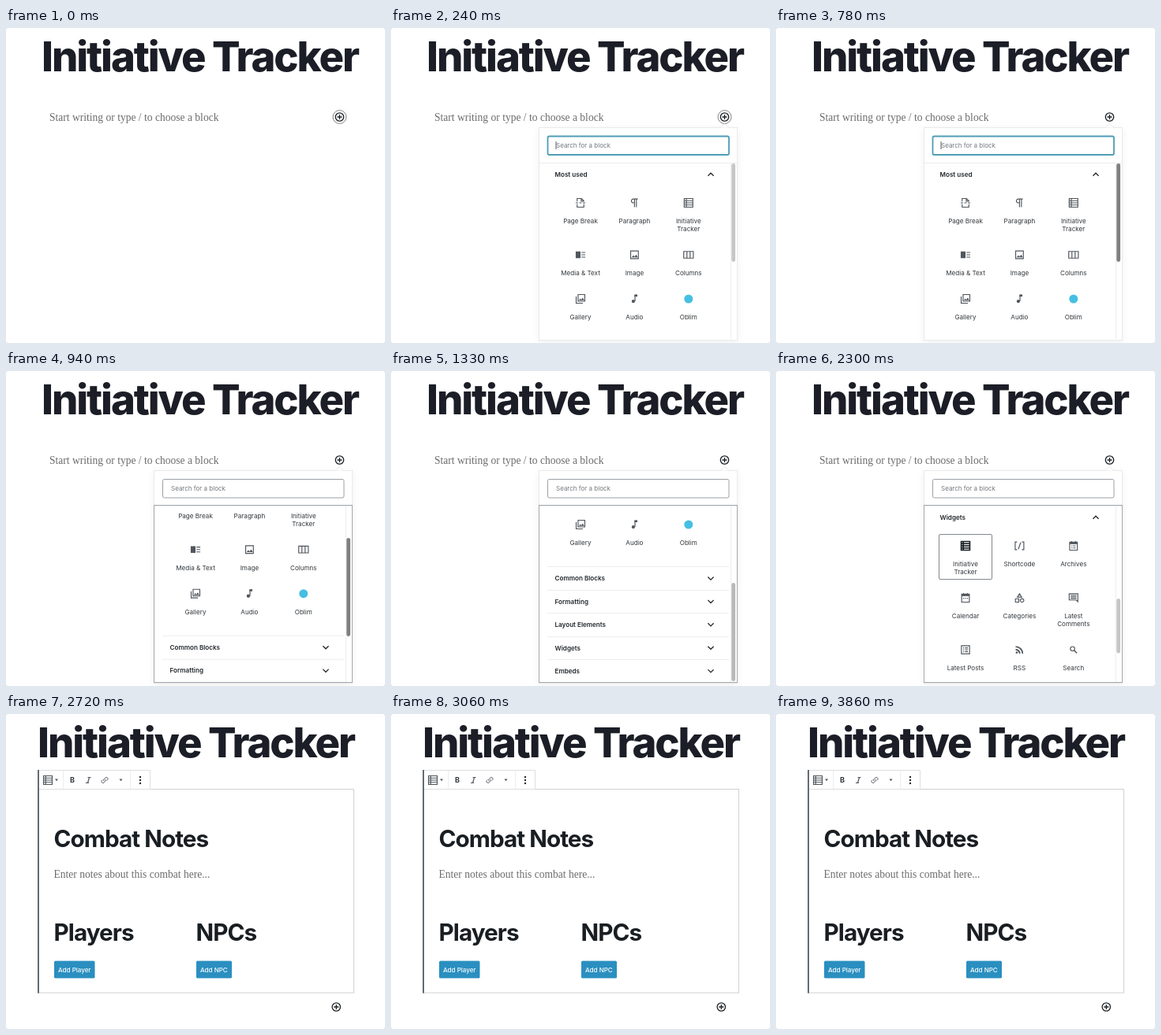
Write an HTML page that moves like this. It is 480x400 px and loops after 4.04 s.

```html
<!DOCTYPE html>
<html lang="en">
<head>
<meta charset="utf-8">
<title>Initiative Tracker block</title>
<style>
  html, body { margin: 0; width: 100%; height: 100%; overflow: hidden; background: #fff; }
  svg { display: block; width: 480px; height: 400px; }
  text { font: 400 8px Inter, sans-serif; fill: #32373c; }
  .title { font-weight: 800; font-size: 52.6px; letter-spacing: -.0395em; fill: #1b1e26; text-anchor: middle; }
  .heading { font-weight: 700; font-size: 29.7px; letter-spacing: -.032em; fill: #191e23; }
  .prompt { font: 13.55px "Liberation Serif", serif; fill: #6c6c6c; }
  .label { font-size: 8.1px; text-anchor: middle; }
  .panel { font-size: 8.1px; font-weight: 600; fill: #23282d; }
  .hint { fill: #72777c; }
  .button { font-weight: 500; fill: #fff; }
  .line { fill: none; stroke: #ebedef; }
  .icon { fill: none; stroke: #50565d; stroke-width: 1.9; }
  .solid { fill: #50565d; stroke: none; }
  .dark .icon { stroke: #191e23; stroke-width: 2.5; }
  .chevron { fill: none; stroke: #23282d; stroke-width: 1.3; }
  .caret { stroke: #32373c; stroke-width: .8; }
</style>
</head>
<body>
<svg id="stage" viewBox="0 0 480 400"></svg>
<script>
const LOOP = 4040;
const OPEN = [140, 220], RING_OFF = 440, DRAG = [800, 1120], WIDGETS = 1640, HOVER = 2020, INSERT = 2440;
const SCROLL = 149;

// Icons are drawn in a 24 unit box: [stroked path, filled path].
const table = 'M3 3h18v18H3zM3 7.5h18M3 12h18M3 16.5h18M7.5 3v18';
const calendar = 'M4 4.5h16V21H4zM8 2v3M16 2v3', calendarTop = 'M4 4h16v4.5H4z';
const icons = {
  pageBreak: ['M5 9V3h9l5 5v1M13.5 3v5.5H19M5 15v6h14v-6M2 12h5M9.5 12h5M17 12h5'],
  paragraph: ['M19 4H9.5a4 4 0 0 0 0 8H12M12 4v17M16 4v17'],
  tracker: [table],
  mediaText: ['M14 7h8M14 12h8M14 17h8', 'M2 5h10v14H2z'],
  image: ['M4 4h16v16H4z', 'M6 17.5l3.5-4.5 2.5 3 3.5-4.5 3.5 6z'],
  columns: ['M2 5h20v14H2zM8.7 5v14M15.3 5v14'],
  gallery: ['M7 3h14v14H7zM3 7v14h14', 'M8.5 15l3-4 2.2 2.6L16.5 9.5l3.5 5.5z'],
  audio: ['M13 17V4.5h4.5', 'M13 17a3.5 3.5 0 1 1-7 0a3.5 3.5 0 1 1 7 0M12 3h6v4h-6z'],
  shortcode: ['M7 4H3v16h4M17 4h4v16h-4M14.5 5l-5 14'],
  archives: [calendar + 'M7.5 12h2M11 12h5.5M7.5 16.5h2M11 16.5h5.5', calendarTop],
  calendar: [calendar + 'M7 13h2M11 13h2M15 13h2', calendarTop],
  categories: ['M12 3.5l4.5 7h-9zM3.5 14h7v7h-7zM21 17.5a3.7 3.7 0 1 1-7.4 0a3.7 3.7 0 1 1 7.4 0'],
  comments: ['M3 3.5h18V20l-3.5-3.5H3zM6 7h12M6 10h12M6 13h12'],
  posts: ['M3.5 3.5h17v17h-17zM7 8h2M11 8h6M7 12h2M11 12h6M7 16h2M11 16h6'],
  rss: ['', 'M4 4v3.2A12.8 12.8 0 0 1 16.8 20H20A16 16 0 0 0 4 4zM4 10v3.2A6.8 6.8 0 0 1 10.8 20H14A10 10 0 0 0 4 10zM8.4 17.8a2.2 2.2 0 1 1-4.4 0a2.2 2.2 0 1 1 4.4 0'],
  search: ['M14.5 10a4.5 4.5 0 1 1-9 0a4.5 4.5 0 1 1 9 0', 'M12.5 14l1.500-1.500 6 5.500-2 2z'],
  link: ['M10.5 14.5a4 4 0 0 1 0-5.5l3.5-3.5a4 4 0 0 1 5.5 5.5l-2 2M13.5 9.5a4 4 0 0 1 0 5.5L10 18.5a4 4 0 0 1-5.5-5.5l2-2']
};

const text = (x, y, words, cls) => `<text x="${x}" y="${y}" class="${cls}">${words}</text>`;
const rect = (x, y, w, h, attrs) => `<rect x="${x}" y="${y}" width="${w}" height="${h}" ${attrs}/>`;
const path = (d, cls) => `<path d="${d}" class="${cls}"/>`;

function icon(name, x, y, size = 14.6) {
  const k = size / 24, [stroked, filled = ''] = icons[name];
  return `<g transform="translate(${x - 12 * k} ${y - 12 * k}) scale(${k})">${path(stroked, 'icon')}${path(filled, 'solid')}</g>`;
}

function tile(column, y, name, ...lines) {
  const x = 240 + column * 68.4;
  const mark = name === 'disc' ? `<circle cx="${x}" cy="${y}" r="5.5" fill="#46bfe2"/>` : icon(name, x, y);
  return mark + lines.map((line, i) => text(x, y + 26 + i * 10, line, 'label')).join('');
}

function panelHeader(y, name, open) {
  const tip = open ? -1.8 : 1.8;
  return text(207.5, y + 3, name, 'panel') +
    path(`M401.4 ${y - tip}L405 ${y + tip}L408.6 ${y - tip}`, 'chevron');
}

const plus = (x, y) =>
  `<g fill="none" stroke="#191e23" stroke-width="1.3"><circle cx="${x}" cy="${y}" r="5.2"/><path d="M${x - 3} ${y}h6M${x} ${y - 3}v6"/></g>`;

const mostUsed = panelHeader(186, 'Most used', true) +
  tile(0, 222, 'pageBreak', 'Page Break') + tile(1, 222, 'paragraph', 'Paragraph') +
  tile(2, 222, 'tracker', 'Initiative', 'Tracker') +
  tile(0, 288, 'mediaText', 'Media &amp; Text') + tile(1, 288, 'image', 'Image') + tile(2, 288, 'columns', 'Columns') +
  tile(0, 344, 'gallery', 'Gallery') + tile(1, 344, 'audio', 'Audio') + tile(2, 344, 'disc', 'Oblim') +
  ['Common Blocks', 'Formatting', 'Layout Elements', 'Widgets', 'Embeds'].map((name, i) => {
    const y = 412.3 + i * 29.4;
    return path(`M198 ${Math.round(y - 15) + .5}h230`, 'line') + panelHeader(y, name, false);
  }).join('');

const widgets = panelHeader(186, 'Widgets', true) +
  tile(0, 222, 'tracker', 'Initiative', 'Tracker') + tile(1, 222, 'shortcode', 'Shortcode') +
  tile(2, 222, 'archives', 'Archives') +
  tile(0, 288, 'calendar', 'Calendar') + tile(1, 288, 'categories', 'Categories') +
  tile(2, 288, 'comments', 'Latest', 'Comments') +
  tile(0, 354, 'posts', 'Latest Posts') + tile(1, 354, 'rss', 'RSS') + tile(2, 354, 'search', 'Search') +
  `<g id="hover" class="dark">${rect(206.5, 207.5, 67, 57, 'rx="1.5" fill="none" stroke="#82878c"')}${icon('tracker', 240, 222)}</g>`;

const inserter =
  rect(187.5, 126.5, 251, 270, 'fill="#fff" stroke="#e8eaec" filter="url(#shadow)"') +
  '<path d="M417 126.5l5.5-5 5.5 5" fill="#fff" stroke="#e8eaec"/>' +
  rect(198.5, 137.5, 229.5, 23.5, 'id="field" rx="2" fill="#fff"') +
  text(209, 152, 'Search for a block', 'hint') +
  path('M209 144v10', 'caret') +
  path('M188 171.5h250M430.5 172v223', 'line') +
  `<g clip-path="url(#view)"><g id="mostUsed">${mostUsed}</g><g id="widgets">${widgets}</g></g>` +
  rect(431.3, 172, 4.8, 125, 'id="thumb" rx="2.4"') +
  rect(187.5, 170.5, 251, 225, 'id="focus" fill="none" stroke="#a5a8ac"');

const button = (x, w, words) => rect(x, 313.5, w, 22, 'rx="1.5" fill="#2a8fc0"') + text(x + 5, 327.5, words, 'button');

const block =
  text(240.5, 55, 'Initiative Tracker', 'title') +
  rect(40.5, 95.5, 400, 258.5, 'fill="#fff" stroke="#cfd1d4"') +
  rect(40.5, 71.5, 142, 24, 'fill="#fff" stroke="#dcdee1"') +
  path('M72.5 72v23M157.5 72v23', 'line') +
  '<path d="M41 71v283.5" stroke="#555d66" stroke-width="1.8"/>' +
  icon('tracker', 53, 84) + icon('link', 125, 84, 12) +
  path('M62 82.5h4l-2 2.8zM143.5 82.5h4l-2 2.8z', 'solid') +
  '<text x="81" y="87.3" style="font-weight:700;font-size:9px">B</text>' +
  '<path d="M103.5 80.5h4M101 87.5h4M105.5 80.5l-2 7" fill="none" stroke="#50565d" stroke-width="1.2"/>' +
  [80, 84, 88].map(y => `<circle cx="170" cy="${y}" r="1.2" fill="#23282d"/>`).join('') +
  text(60.5, 169, 'Combat Notes', 'heading') +
  text(60.5, 207.5, 'Enter notes about this combat here...', 'prompt') +
  text(60.5, 288, 'Players', 'heading') + text(240.5, 288, 'NPCs', 'heading') +
  button(61, 51.5, 'Add Player') + button(241, 45, 'Add NPC') +
  plus(418.3, 372);

const empty =
  text(245.5, 55, 'Initiative Tracker', 'title') +
  text(55, 117.5, 'Start writing or type / to choose a block', 'prompt') +
  '<circle id="ring" cx="422.5" cy="113" r="8.5" fill="none" stroke="#777" stroke-width=".9"/>' +
  plus(422.5, 113);

document.getElementById('stage').innerHTML =
  `<defs><clipPath id="view">${rect(188, 172, 242, 223, '')}</clipPath>
  <filter id="shadow"><feDropShadow dx="0" dy="2" stdDeviation="4" flood-color="#191e23" flood-opacity=".06"/></filter></defs>` +
  rect(0, 0, 480, 400, 'fill="#ddd"') + rect(0, 0, 480, 400, 'rx="3" fill="#fff"') +
  `<g id="empty">${empty}</g><g id="inserter">${inserter}</g><g id="block">${block}</g>`;

const part = id => document.getElementById(id);
const caret = document.querySelector('.caret');

const show = (node, on) => node.setAttribute('display', on ? 'inline' : 'none');
const set = (node, attrs) => Object.entries(attrs).forEach(([key, value]) => node.setAttribute(key, value));
const progress = (t, [from, to]) => Math.min(1, Math.max(0, (t - from) / (to - from)));

function draw(t) {
  const inserted = t >= INSERT, opened = t >= WIDGETS, dragged = t >= DRAG[0];
  const p = progress(t, DRAG), scroll = p * p * (3 - 2 * p);
  const scale = 1 - (1 - progress(t, OPEN)) ** 3;

  show(part('empty'), !inserted);
  show(part('block'), inserted);
  show(part('inserter'), !inserted && scale > 0);
  show(part('ring'), t < RING_OFF);
  show(part('mostUsed'), !opened);
  show(part('widgets'), opened);
  show(part('hover'), t >= HOVER);
  show(part('focus'), dragged);
  show(caret, !dragged);

  set(part('inserter'), { transform: `translate(422.5 122) scale(${scale}) translate(-422.5 -122)` });
  set(part('mostUsed'), { transform: `translate(0 ${-SCROLL * scroll})` });
  set(part('field'), dragged ? { stroke: '#9aa0a6', 'stroke-width': 1 } : { stroke: '#4f9db5', 'stroke-width': 1.8 });
  const grabbed = t >= 700 && t < DRAG[1] + 60;
  set(part('thumb'), {
    y: opened ? 289 : 172 + 97 * scroll,
    height: opened ? 69.5 : 125,
    fill: grabbed ? '#808080' : dragged && !opened ? '#b8b8b8' : '#c6c6c6'
  });
}

function tick() {
  draw(performance.now() % LOOP);
  requestAnimationFrame(tick);
}
tick();
</script>
</body>
</html>
```
